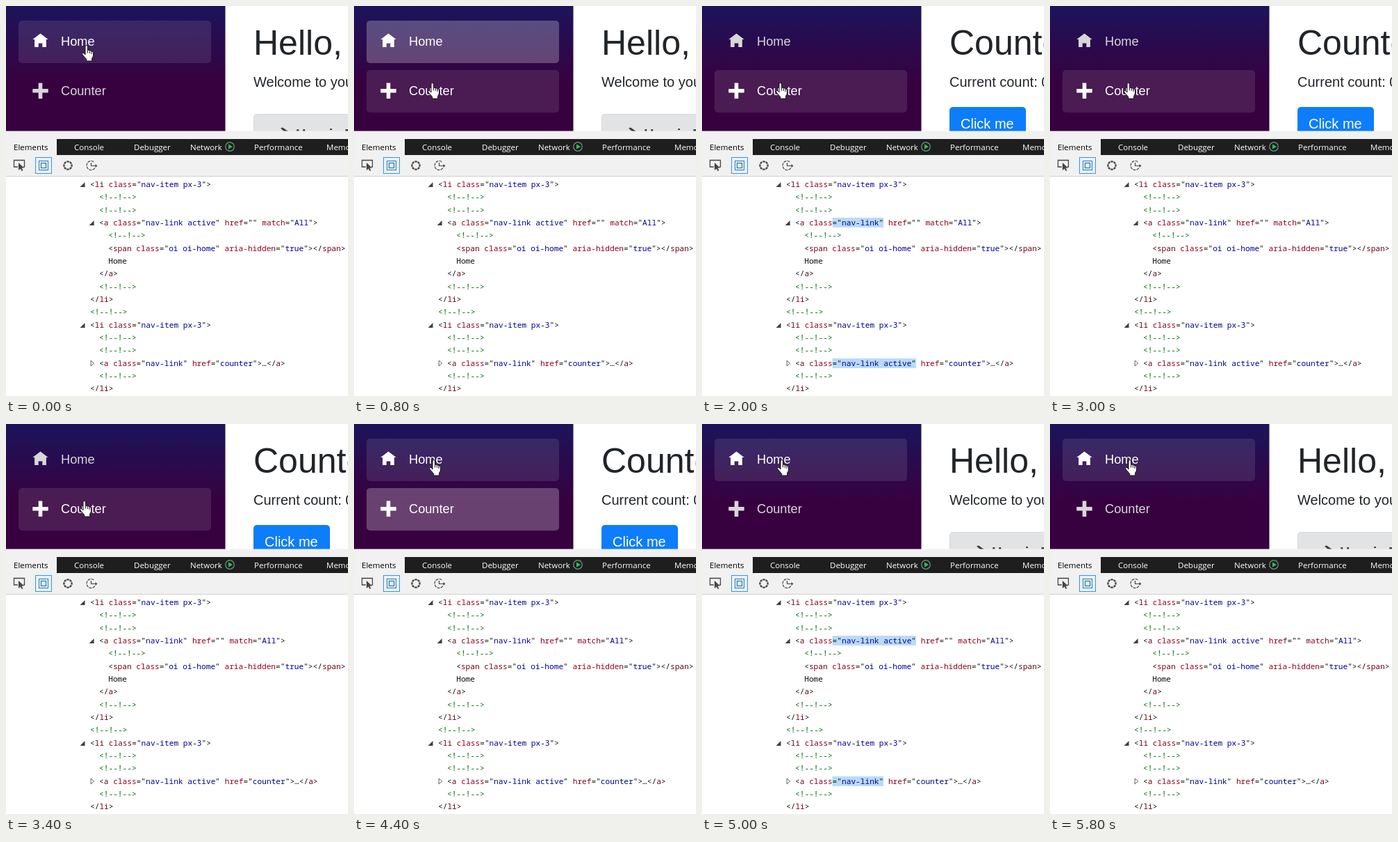
Write an HTML page with a canvas that moves like this. It is 492 by 560 pixels and loops after 6000 ms.

```html
<!DOCTYPE html>
<html lang="en">
<head>
<meta charset="utf-8">
<title>Nav link states</title>
<style>
  html, body { margin: 0; width: 100%; height: 100%; overflow: hidden; background: #fff; }
  canvas { display: block; }
</style>
</head>
<body>
<canvas id="stage" width="492" height="560"></canvas>
<script>
const ctx = document.getElementById('stage').getContext('2d');
const LOOP = 6000, STEP = 200;
// Pointer moves, link clicks and how long changed attributes stay marked.
const TO_COUNTER = 400, CLICK_COUNTER = 1600, TO_HOME = 4400, CLICK_HOME = 4600, MARK = 1200;
const SANS = '"Liberation Sans", Arial, sans-serif';
const UI = '"Open Sans", "Noto Sans", sans-serif';
const MONO = '500 11.15px "Noto Sans Mono", "DejaVu Sans Mono", monospace';
const CHAR = 6.69, LINE = 18.33;
const INK = '#212529';

const HOME = new Path2D('M4 0l-4 3h1v4h2v-2h2v2h2v-4h1z');
const PLUS = new Path2D('M3 0v3h-3v2h3v3h2v-3h3v-2h-3v-3z');
const HAND = new Path2D('M5 14V2Q5 .5 6.7 .5T8.4 2V7.5Q10 6.4 11.3 8Q13 7.2 14 9Q16.5 8.6 16.5 11' +
  'V15Q16.5 17 14.7 19V23H6.7V20.5L1 14Q0 12 1.5 11.3Q3 11 5 14Z');

const between = (t, a, b) => t >= a && t < b;

function rect(x, y, w, h, color) {
  ctx.fillStyle = color;
  ctx.fillRect(x, y, w, h);
}

function round(x, y, w, h, r, color) {
  ctx.fillStyle = color;
  ctx.beginPath();
  ctx.roundRect(x, y, w, h, r);
  ctx.fill();
}

function text(s, x, y, font, color) {
  ctx.font = font;
  ctx.fillStyle = color;
  ctx.fillText(s, x, y);
}

function poly(points, color) {
  ctx.fillStyle = color;
  ctx.beginPath();
  points.forEach(([x, y]) => ctx.lineTo(x, y));
  ctx.closePath();
  ctx.fill();
}

function line(points, color, width) {
  ctx.strokeStyle = color;
  ctx.lineWidth = width;
  ctx.beginPath();
  points.forEach(([x, y]) => ctx.lineTo(x, y));
  ctx.stroke();
}

function arc(x, y, r, a, b, color, width) {
  ctx.strokeStyle = color;
  ctx.lineWidth = width;
  ctx.beginPath();
  ctx.arc(x, y, r, a, b);
  ctx.stroke();
}

function frame(x, y, w, h, color, width) {
  ctx.strokeStyle = color;
  ctx.lineWidth = width;
  ctx.strokeRect(x, y, w, h);
}

function navItem(label, icon, y, active, hover) {
  if (active || hover) round(18, y, 277, 61, 5, `rgba(255,255,255,${hover ? 0.1 : 0.25})`);
  const color = active || hover ? '#fff' : '#d7d7d7';
  ctx.save();
  ctx.translate(38.3, y + 18.5);
  ctx.scale(2.8, 2.8);
  ctx.fillStyle = color;
  ctx.fill(icon);
  ctx.restore();
  text(label, 79, y + 36, '18.2px ' + SANS, color);
}

function cursor(x, y) {
  ctx.save();
  ctx.translate(x, y);
  ctx.fillStyle = '#fff';
  ctx.fill(HAND);
  ctx.strokeStyle = '#111';
  ctx.lineWidth = 1;
  ctx.stroke(HAND);
  for (const [kx, ky] of [[8.4, 7.5], [11.3, 8], [14, 9]]) line([[kx, ky], [kx, ky + 4]], '#111', 1);
  ctx.restore();
}

function page(counter) {
  rect(315.5, 0, 177, 180, '#fff');
  text(counter ? 'Counter' : 'Hello, world!', 356, 70, '50px ' + SANS, INK);
  text(counter ? 'Current count: 0' : 'Welcome to your new app.', 356, 116, '20px ' + SANS, INK);
  if (counter) {
    round(356, 145, 110, 48, 5, '#0d7dfc');
    text('Click me', 372, 176, '20px ' + SANS, '#fff');
    return;
  }
  round(356, 155, 200, 70, 5, '#d6d8db');
  round(357, 156, 200, 70, 4, '#e2e3e5');
  poly([[395, 175.5], [398, 174.5], [406, 180], [400, 180]], '#383d41');
  text('How is Blazor', 417, 190.5, 'bold 20px ' + SANS, '#383d41');
}

function app(t, counter) {
  ctx.save();
  ctx.beginPath();
  ctx.rect(0, 0, 492, 180);
  ctx.clip();
  const g = ctx.createLinearGradient(0, 0, 0, 110);
  g.addColorStop(0, '#1c145b');
  g.addColorStop(1, '#370140');
  rect(0, 0, 316, 180, g);
  const onCounter = between(t, TO_COUNTER, TO_HOME);
  navItem('Home', HOME, 21, !counter, !onCounter);
  navItem('Counter', PLUS, 92, counter, onCounter);
  page(counter);
  if (onCounter) cursor(106, 110);
  else if (t < TO_COUNTER) cursor(109, 56);
  else cursor(108, 51);
  ctx.restore();
}

function toolbar() {
  rect(0, 179.5, 492, 64.5, '#f1f1f1');
  rect(73, 191, 419, 23, '#1e1e1e');
  rect(0, 244, 492, 1, '#d0d0d0');
  const tabs = [['Elements', 11], ['Console', 98], ['Debugger', 184], ['Network', 265],
    ['Performance', 357], ['Memory', 461]];
  tabs.forEach(([s, x], i) => text(s, x, 207, '11.5px ' + UI, i ? '#fff' : '#000'));
  arc(322, 202, 6.3, 0, 7, '#719786', 1.2);
  poly([[320, 198.5], [326, 202], [320, 205.5]], '#22c55e');

  const dark = '#454545', blue = '#2b7cb8';
  // element picker
  line([[17, 231], [11.5, 231], [11.5, 221.5], [26.5, 221.5], [26.5, 231], [25, 231]], dark, 1.3);
  poly([[18, 225], [18, 236], [20.7, 233.5], [22.7, 237], [24.5, 236], [22.5, 232.7], [26, 232.5]], dark);
  // box highlighter
  rect(42, 217, 24, 24, '#e8f1f8');
  frame(42.5, 217.5, 23, 23, '#3c97d8', 1);
  frame(47.5, 222.5, 13, 13, blue, 1);
  frame(50.5, 225.5, 7, 7, blue, 1.3);
  // dashed ring
  for (let i = 0; i < 8; i++) {
    const a = i * Math.PI / 4;
    arc(89, 229, 5.6, a - 0.31, a + 0.31, dark, 2.4);
  }
  // clock
  ctx.setLineDash([4, 1.2]);
  arc(122.5, 229, 6.5, 0.6, 5.4, dark, 1.2);
  ctx.setLineDash([]);
  line([[122.5, 225], [122.5, 229.5], [130, 229.5]], dark, 1.2);
  poly([[128.5, 227], [131.5, 229.5], [128.5, 232]], dark);
}

const COLORS = { tag: '#6b0016', attr: '#8f001c', value: '#00009a', note: '#006a10', mark: '#101010' };

// Splits markup into coloured parts and lays them out on the character grid.
function code(s, x, y) {
  const parts = /(<!--.*?-->)|(<\/?)(\w+)|([\w-]+)(=")([^"]*)(")|[^<]/g;
  let col = 0, m;
  const put = (str, kind) => {
    for (const ch of str) {
      text(ch, x + col * CHAR, y, MONO, COLORS[kind]);
      col++;
    }
  };
  while ((m = parts.exec(s))) {
    if (m[1]) put(m[1], 'note');
    else if (m[2]) { put(m[2], 'mark'); put(m[3], 'tag'); }
    else if (m[4]) { put(m[4], 'attr'); put(m[5], 'mark'); put(m[6], 'value'); put(m[7], 'mark'); }
    else put(m[0], 'mark');
  }
}

function tree(counter, lit) {
  rect(0, 245, 492, 315, '#fff');
  const home = counter ? 'nav-link' : 'nav-link active';
  const count = counter ? 'nav-link active' : 'nav-link';
  const note = '<!--!-->', item = '<li class="nav-item px-3">';
  const lines = [
    [0, item, 'open'], [1, note], [1, note],
    [1, `<a class="${home}" href="" match="All">`, 'open', home],
    [2, note], [2, '<span class="oi oi-home" aria-hidden="true"></span>'], [2, 'Home'],
    [1, '</a>'], [1, note], [0, '</li>'], [0, note],
    [0, item, 'open'], [1, note], [1, note],
    [1, `<a class="${count}" href="counter">…</a>`, 'shut', count],
    [1, note], [0, '</li>']
  ];
  lines.forEach(([depth, s, arrow, cls], i) => {
    const x = 121 + depth * 13.1, y = Math.round(260 + i * LINE);
    if (lit && cls) rect(x + 8 * CHAR, y - 11, (cls.length + 3) * CHAR, 14, '#b9dbf9');
    if (arrow === 'open') poly([[x - 7.5, y - 7], [x - 7.5, y], [x - 14.5, y]], '#404040');
    if (arrow === 'shut') line([[x - 12, y - 8], [x - 7.5, y - 4], [x - 12, y], [x - 12, y - 8]], '#606060', 1);
    code(s, x, y);
  });
}

function draw(now) {
  const t = Math.floor((now % LOOP) / STEP) * STEP;
  const counter = between(t, CLICK_COUNTER, CLICK_HOME);
  const lit = [CLICK_COUNTER, CLICK_HOME].some(c => between(t, c, c + MARK));
  app(t, counter);
  toolbar();
  tree(counter, lit);
}

const start = performance.now();
function tick() {
  draw(performance.now() - start);
  requestAnimationFrame(tick);
}
tick();
</script>
</body>
</html>
```
